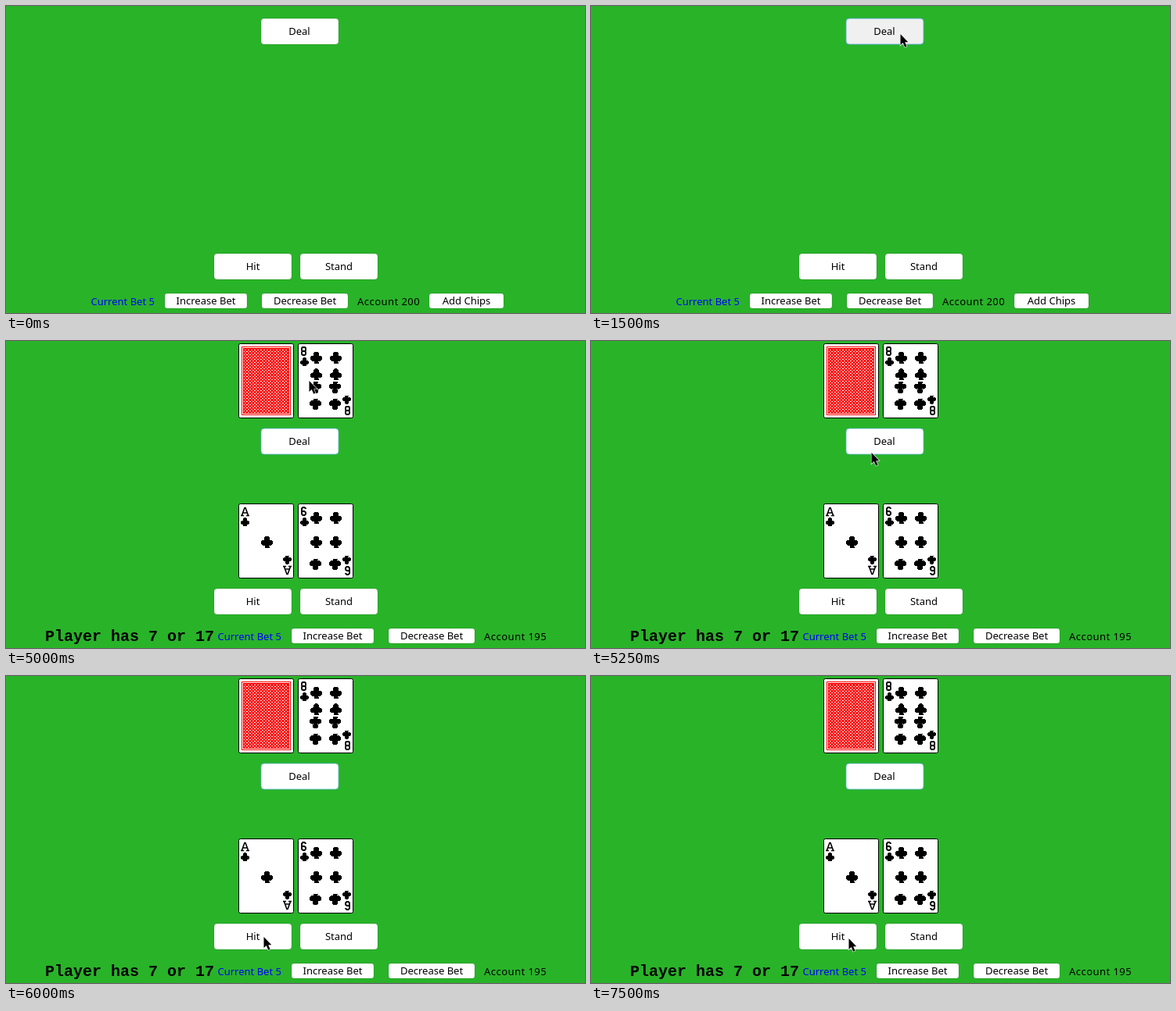
An HTML page for the animation above (8000 ms loop, 740 by 393 pixels).

```html
<!DOCTYPE html>
<html lang="en">
<head>
<meta charset="utf-8">
<title>Blackjack table</title>
<style>
  html, body { margin: 0; width: 100%; height: 100%; overflow: hidden; background: #29b329; }
  svg { display: block; }
  text { font: 13px "Noto Sans", "Open Sans", sans-serif; }
  .mid { text-anchor: middle; }
  .loose { letter-spacing: .45px; }
  .status { font: bold 20px "Liberation Mono", monospace; }
  .button { fill: #fff; stroke: #000; stroke-opacity: .13; }

  .before, .after, .row, .deal, .deal .button, .cursor {
    animation: 8s step-end infinite;
  }
  .before { animation-name: before; }
  .after { animation-name: after; }
  .row { animation-name: row; }
  .deal { animation-name: deal; }
  .deal .button { animation-name: press; }
  .cursor { animation-name: cursor; }

  @keyframes before { 0% { opacity: 1; } 21.875%, 100% { opacity: 0; } }
  @keyframes after { 0% { opacity: 0; } 21.875%, 100% { opacity: 1; } }
  @keyframes row { 0% { transform: none; } 21.875%, 100% { transform: translateX(162px); } }
  @keyframes deal { 0% { transform: none; } 21.875%, 100% { transform: translateY(96px); } }
  @keyframes press {
    0% { fill: #fff; stroke: #000; stroke-opacity: .13; }
    18.75% { fill: #f0f0f0; stroke: #5aa9d6; stroke-opacity: .85; }
    21.875%, 100% { fill: #fff; stroke: #5ab4c8; stroke-opacity: .8; }
  }
  @keyframes cursor {
    0% { opacity: 0; transform: translate(409px, 17px); }
    12.5% { opacity: 1; transform: translate(409px, 17px); }
    15.625% { transform: translate(395px, 36px); }
    62.5% { transform: translate(387px, 51px); }
    65.625% { transform: translate(358px, 143px); }
    68.75% { transform: translate(342px, 241px); }
    71.875% { transform: translate(331px, 315px); }
    75% { transform: translate(329px, 334px); }
    78.125%, 100% { opacity: 1; transform: translate(329px, 336px); }
  }
</style>
</head>
<body>
<svg width="740" height="393" viewBox="0 0 740 393">
  <defs>
    <g id="club" shape-rendering="crispEdges">
      <circle cy="-4" r="3.5"/>
      <circle cx="-4" cy="1.4" r="3.5"/>
      <circle cx="4" cy="1.4" r="3.5"/>
      <path d="M-1.5-2h3V3L3 6V7.5H-3V6L-1.5 3z"/>
    </g>
    <use id="small" href="#club" transform="translate(8.5 23.5) scale(.74)"/>
    <g id="pair">
      <use href="#club" x="23.5"/>
      <use href="#club" x="48.5"/>
    </g>
    <rect id="face" x=".5" y=".5" width="70" height="95" rx="2" fill="#fff" stroke="#000"/>

    <g id="aceHalf">
      <path d="M4.5 15L8 5.5h1L12.5 15M6 12h5M3 15.5h4M10 15.5h4" fill="none" stroke="#000" stroke-width="1.6"/>
      <use href="#small"/>
    </g>
    <g id="sixHalf">
      <path d="M10 7V6.5L8.5 5H6.5L5 6.5V13.5L6.5 15H8.5L10 13.5V11.5L8.5 10H5" fill="none" stroke="#000" stroke-width="1.9"/>
      <use href="#small"/>
      <use href="#pair" y="18"/>
    </g>
    <g id="eightHalf">
      <g fill="none" stroke="#000" stroke-width="1.9">
        <rect x="5" y="5" width="5" height="5" rx="1.5"/>
        <rect x="5" y="10" width="5" height="5" rx="1.5"/>
      </g>
      <use href="#small"/>
      <use href="#pair" y="18"/>
      <use href="#pair" y="39.5"/>
    </g>

    <pattern id="weave" width="4" height="4" patternUnits="userSpaceOnUse">
      <path d="M0 0h4v4h-4z" fill="#f00"/>
      <path d="M0 0h2v1h-2zM2 2h2v1h-2z" fill="#fff"/>
    </pattern>
  </defs>

  <rect width="740" height="393" fill="#29b329"/>

  <g class="after">
    <g transform="translate(297 3)">
      <use href="#face"/>
      <g shape-rendering="crispEdges">
        <rect x="4" y="4" width="63" height="88" fill="#f00"/>
        <rect x="5.5" y="5.5" width="60" height="85" fill="none" stroke="#fff"/>
        <rect x="6" y="6" width="59" height="84" fill="#f00"/>
        <rect x="7" y="7" width="57" height="82" fill="url(#weave)"/>
      </g>
    </g>
    <g transform="translate(373 3)">
      <use href="#face"/>
      <use href="#eightHalf"/>
      <use href="#eightHalf" transform="rotate(180 35.5 48)"/>
    </g>
    <g transform="translate(297 208)">
      <use href="#face"/>
      <use href="#aceHalf"/>
      <use href="#aceHalf" transform="rotate(180 35.5 48)"/>
      <use href="#club" x="36.5" y="49"/>
    </g>
    <g transform="translate(373 208)">
      <use href="#face"/>
      <use href="#sixHalf"/>
      <use href="#sixHalf" transform="rotate(180 35.5 48)"/>
      <use href="#pair" y="49"/>
    </g>
    <text class="status" x="50" y="384">Player has 7 or 17</text>
  </g>

  <g class="deal">
    <rect class="button" x="326" y="16" width="99" height="33" rx="4"/>
    <text class="mid" x="375" y="37">Deal</text>
  </g>

  <rect class="button" x="266" y="317" width="99" height="33" rx="4"/>
  <text class="mid" x="315.5" y="338">Hit</text>
  <rect class="button" x="376" y="317" width="99" height="33" rx="4"/>
  <text class="mid" x="425.5" y="338">Stand</text>

  <g class="row">
    <text x="108.5" y="383" fill="#00f">Current Bet 5</text>
    <rect class="button" x="203" y="368" width="105" height="19" rx="3"/>
    <text class="mid" x="255.5" y="382">Increase Bet</text>
    <rect class="button" x="327" y="368" width="110" height="19" rx="3"/>
    <text class="mid" x="382" y="382">Decrease Bet</text>
    <text class="loose before" x="449" y="383">Account 200</text>
    <text class="loose after" x="449" y="383">Account 195</text>
    <g class="before">
      <rect class="button" x="541" y="368" width="95" height="19" rx="3"/>
      <text class="mid" x="588.5" y="382">Add Chips</text>
    </g>
  </g>

  <path class="cursor" d="M.5 0V14L3.7 11L6.2 16.8L8.6 15.8L6.2 10.2H10.3z" fill="#000" stroke="#fff" stroke-width="1.2" paint-order="stroke"/>
</svg>
</body>
</html>
```
